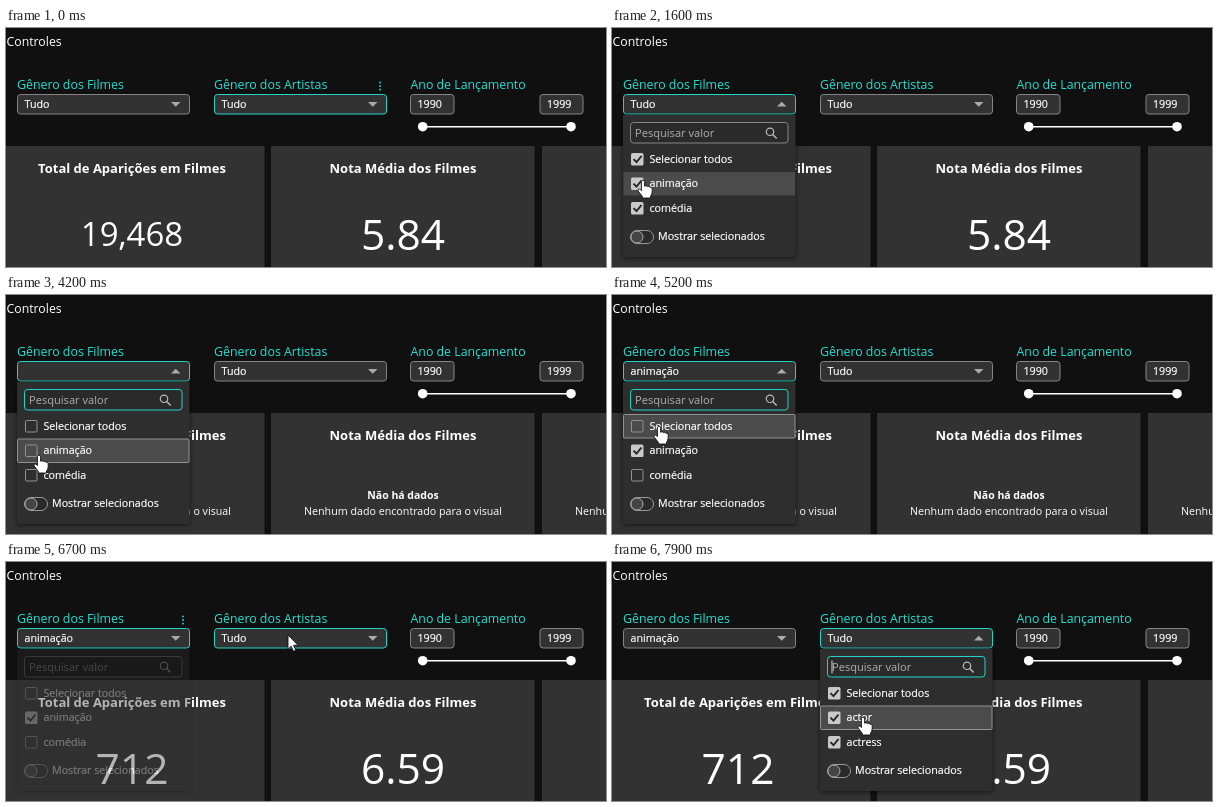
These frames come from a looping animation (600 by 239 pixels, 8000 ms). An HTML page:

```html
<!DOCTYPE html>
<html lang="pt-BR">
<head>
<meta charset="utf-8">
<title>Controles</title>
<style>
  html, body { margin: 0; width: 100%; height: 100%; overflow: hidden; background: #111011; }
  svg { display: block; width: 100vw; height: 100vh; }
  text { font: 10.7px "Open Sans", "Noto Sans", sans-serif; fill: #fff; white-space: pre; }
  .label { font-size: 12.35px; fill: #22dfd2; }
  .heading { font-size: 12.3px; }
  .title { font-size: 13px; font-weight: 700; }
  .bold { font-weight: 700; font-size: 10.5px; }
  .panel text, .field text { stroke: #fff; stroke-width: .2; }
  .panel .hint { fill: #b0b0b0; stroke: none; font-size: 11.1px; }
  .mid { text-anchor: middle; }
</style>
</head>
<body>
<svg id="stage" viewBox="0 0 600 239"></svg>
<script>
const LOOP = 8000, STEP = 100;
const TEAL = '#22d3c8', GREY = '#858585';
const stage = document.getElementById('stage');

// Cursor stops: time, x, y of the tip
const path = [
  [100, 226, 140], [500, 107, 75], [1000, 107, 75], [1600, 31, 152],
  [2400, 31, 152], [2700, 30, 175], [3600, 30, 175], [4100, 33, 160],
  [5000, 33, 160], [5200, 47, 131], [5900, 47, 131], [6500, 282, 73],
  [7300, 282, 73], [7800, 251, 155]
];

// Each list holds [start time, value]; the latest started value applies
const filmValue = [[0, 'Tudo'], [1800, 'comédia'], [3400, ''], [4400, 'animação']];
const filmChecks = [[0, [1, 1, 1]], [1800, [0, 0, 1]], [3400, [0, 0, 0]], [4400, [0, 1, 0]]];
const filmFocus = [[0, 1], [2900, 2], [3900, 1], [5100, 0], [5900, 1]];
const data = [[0, ['19,468', '5.84']], [3000, ['18,756', '5.81']], [4000, null], [5800, ['712', '6.59']]];
const dim = [[0, 1], [2400, .7], [2500, .42], [3000, 1], [3600, .42], [4000, 1], [5500, .42], [5800, 1]];
const filmOpen = [[0, 0], [800, .4], [900, 1], [6600, .7], [6700, .35], [6800, 0]];
const artistOpen = [[0, 0], [7000, .4], [7100, 1]];

const at = (list, t) => list.filter(([start]) => start <= t).pop()[1];
const ease = p => p * p * (3 - 2 * p);

const text = (x, y, s, cls = '') => `<text x="${x}" y="${y}" class="${cls}">${s}</text>`;
const box = (x, y, w, h, fill, stroke = 'none', r = 0) =>
  `<rect x="${x}" y="${y}" width="${w}" height="${h}" rx="${r}" fill="${fill}" stroke="${stroke}"/>`;
const line = (d, color, w) => `<path d="${d}" fill="none" stroke="${color}" stroke-width="${w}"/>`;
const group = (x, opacity, body, cls = '') =>
  `<g class="${cls}" transform="translate(${x})" opacity="${opacity}">${body}</g>`;

function field(x, width, value, active) {
  return group(x, 1, box(.5, 66.5, width, 19.5, '#333233', active ? TEAL : GREY, 3) + text(7.5, 80, value), 'field');
}

function select(x, label, value, { active, open, dots }) {
  const arrow = open ? 'M154 78.5h9.5l-4.75-4.8z' : 'M154 74h9.5l-4.75 4.8z';
  const menu = [54.5, 58, 61.5].map(y => box(165.2, y - .8, 1.7, 1.7, TEAL)).join('');
  return text(x, 60.5, label, 'label') + field(x, 172, value, active) +
    group(x, 1, `<path d="${arrow}" fill="#aaa"/>` + (dots ? menu : ''));
}

function checkbox(y, on) {
  return on
    ? box(8, y - 6, 12.5, 12.5, '#c9c9c9', 'none', 1.5) + line(`M10.5 ${y + .2}l3 3 5-6.2`, '#252425', 1.9)
    : box(8.5, y - 5.5, 11.5, 11.5, 'none', '#929292', 1);
}

function panel(x, opacity, names, checks, focus, focused, caret) {
  if (!opacity) return '';
  const rows = names.map((name, i) => {
    const y = 131 + 24.5 * i;
    const band = i === focus ? box(.5, y - 11.5, 171.5, 23.5, '#4c4b4c', focused ? '#929292' : 'none', 1) : '';
    return band + checkbox(y, checks[i]) + text(26.5, y + 3.5, name);
  }).join('');
  const search = box(7.5, 94.5, 157.5, 20.5, '#2b2a2b', focused ? TEAL : GREY, 3) +
    text(12, 109, 'Pesquisar valor', 'hint') +
    `<circle cx="147" cy="103.8" r="3.7" fill="none" stroke="#bbb" stroke-width="1.2"/>` +
    line('M149.7 106.5l4 4', '#bbb', 1.4) + (caret ? line('M12 98.5v13', '#ddd', 1) : '');
  const toggle = box(7.5, 202.5, 23, 13, '#2b2a2b', '#999', 6.5) +
    `<circle cx="14" cy="209" r="6" fill="#464546" stroke="#aaa"/>` + text(35, 212, 'Mostrar selecionados');
  return group(x, opacity,
    `<rect y="87" width="172.5" height="142" fill="#2e2d2e" filter="url(#shadow)"/>` + search + rows + toggle, 'panel');
}

function card(x, w, cx, title, value, size, base, opacity) {
  const body = value === null
    ? text(cx, 204, 'Não há dados', 'mid bold') + text(cx, 220, 'Nenhum dado encontrado para o visual', 'mid')
    : `<text class="mid" x="${cx}" y="${base}" style="font-size:${size}px">${value}</text>`;
  return box(x, 118, w, 121, '#333233') + text(cx, 145, title, 'mid title') + group(0, opacity, body);
}

function cursor(t) {
  if (t < path[0][0]) return '';
  let i = path.findIndex(p => p[0] > t);
  if (i < 0) i = path.length;
  const a = path[i - 1], b = path[i] || a;
  const p = b === a ? 0 : ease((t - a[0]) / (b[0] - a[0]));
  const x = a[1] + (b[1] - a[1]) * p, y = a[2] + (b[2] - a[2]) * p;
  const hand = y > 119 && (t > 800 && t < 6500 || t > 7000);
  const d = hand
    ? 'M-1.6 1.2Q0-1 1.6 1.2V6.2Q3.2 5 4.4 6.6 6 5.6 7 7.2 9 6.6 9.2 8.8V12Q9 14.5 7.6 16V18H-.6V16.5L-5 10.8Q-5.4 8.4-3.2 9L-1.6 10.6Z'
    : 'M0 0V14.2L3.2 11.2 5.4 16.3 7.8 15.2 5.6 10.3H10Z';
  return `<path transform="translate(${x} ${y})" d="${d}" fill="#fff" stroke="#111" stroke-width=".9"/>`;
}

function draw(t) {
  const films = at(filmOpen, t), artists = at(artistOpen, t);
  const values = at(data, t), opacity = at(dim, t);
  const onArtists = t >= 6400;
  const total = values && values[0];
  const wide = total && total.length > 4;
  stage.innerHTML =
    `<defs><filter id="shadow" x="-10%" y="-10%" width="120%" height="120%">
      <feDropShadow dx="0" dy="1" stdDeviation="2.5" flood-color="#000" flood-opacity=".6"/></filter></defs>` +
    box(0, 0, 600, 239, '#111011') +
    text(.5, 17.5, 'Controles', 'heading') +
    card(0, 258.5, 126, 'Total de Aparições em Filmes', total, wide ? 33 : 42.5, wide ? 218 : 221.5, opacity) +
    card(265, 263.5, 397, 'Nota Média dos Filmes', values && values[1], 42.5, 221.5, opacity) +
    card(536, 264, 668, '', values ? '' : null, 42.5, 221.5, opacity) +
    select(11, 'Gênero dos Filmes', at(filmValue, t), {
      active: t >= 400 && t < 7000, open: films > .5 && t < 6600, dots: t >= 400 && t < 800 || t >= 6600 && t < 6900
    }) +
    select(208, 'Gênero dos Artistas', 'Tudo', {
      active: t < 300 || onArtists, open: artists > 0, dots: t < 300 || t >= 6800 && t < 7000
    }) +
    text(404.5, 60.5, 'Ano de Lançamento', 'label') +
    field(404, 43.5, '1990', false) + field(533.5, 43, '1999', false) +
    line('M417 98.7H565', '#fff', 1.6) +
    [416.7, 565].map(x => `<circle cx="${x}" cy="98.7" r="4.8" fill="#fff"/>`).join('') +
    panel(11, films, ['Selecionar todos', 'animação', 'comédia'], at(filmChecks, t),
      t >= 6600 ? -1 : at(filmFocus, t), t >= 1700 && t < 6600, false) +
    panel(208, artists, ['Selecionar todos', 'actor', 'actress'], [1, 1, 1], 1, t >= 7300, t >= 7500) +
    cursor(t);
}

let shown = -1;
const origin = performance.now();
function tick() {
  const t = Math.floor(Math.max(0, performance.now() - origin) % LOOP / STEP) * STEP;
  if (t !== shown) draw(shown = t);
  requestAnimationFrame(tick);
}
tick();
</script>
</body>
</html>
```
